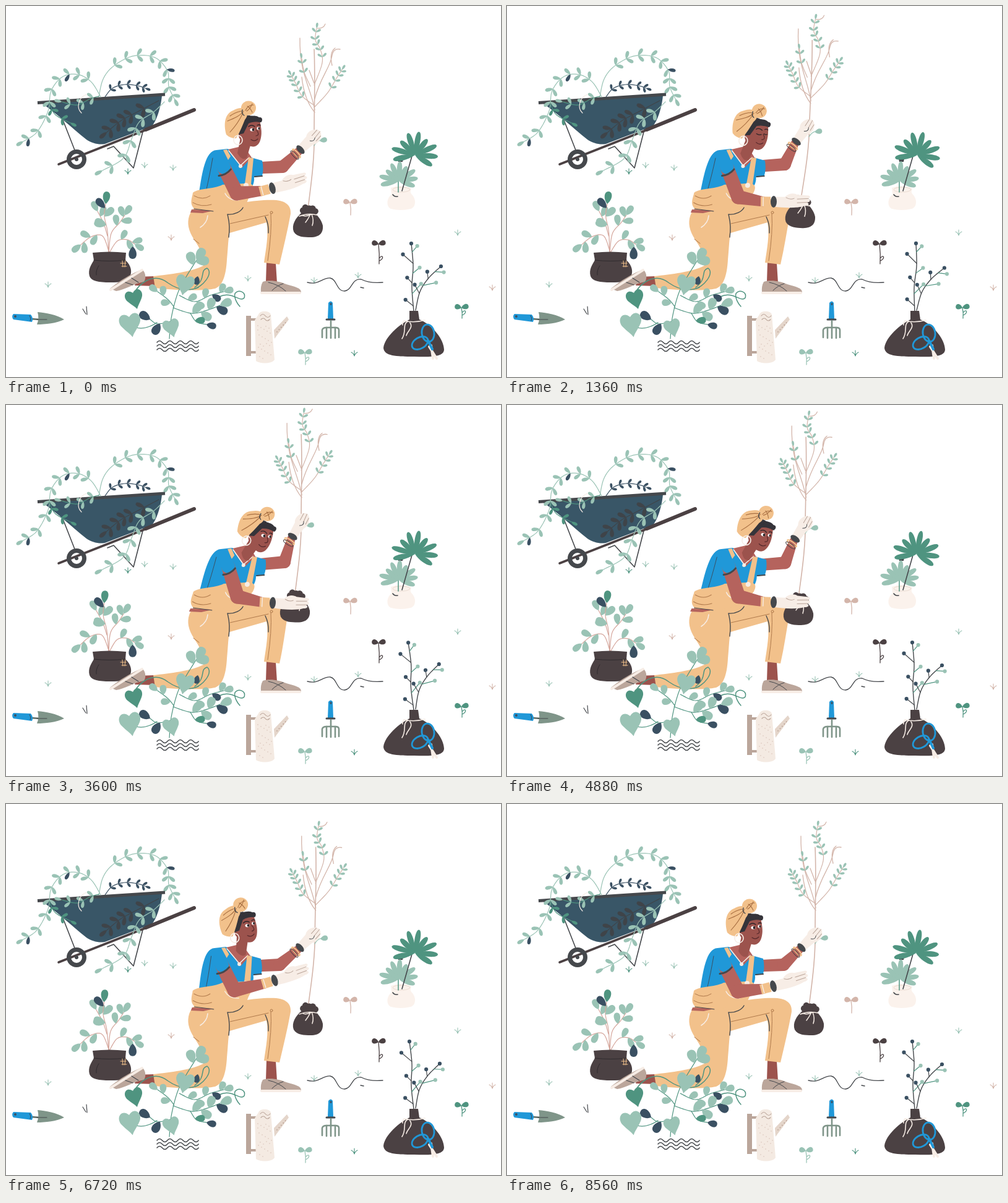
An HTML page with a canvas that plays this animation: 800 px wide and 600 px high, repeating every 8.64 s.

```html
<!DOCTYPE html>
<html lang="en">
<head>
<meta charset="utf-8">
<title>Gardening</title>
<style>
html, body { margin: 0; width: 100%; height: 100%; overflow: hidden; background: #fff; }
canvas { display: block; width: 800px; height: 600px; }
</style>
</head>
<body>
<canvas id="stage" width="800" height="600"></canvas>
<script>
const c = document.getElementById('stage').getContext('2d');
const LOOP = 8640, STEP = 80, RAD = Math.PI / 180;
const LIGHT = '#9ac3b5', GREEN = '#4f9480', NAVY = '#3a5062', DARK = '#4b4143', INK = '#45484c',
  ORANGE = '#f2c18b', SEAM = '#b07a4c', SKIN = '#b5635d', FACE = '#9c534d', BLUE = '#2098d8',
  CREAM = '#f7ede6', TAUPE = '#bba69b', TWIG = '#d3b5aa', STEEL = '#7f9589', PUPIL = '#2d2528';

// drawing helpers
function fill(d, col) { c.fillStyle = col; c.fill(new Path2D(d)); }
function line(d, col, w = 1.2) { c.strokeStyle = col; c.lineWidth = w; c.stroke(new Path2D(d)); }
function oval(x, y, rx, ry, col) {
  c.fillStyle = col; c.beginPath(); c.ellipse(x, y, rx, ry, 0, 0, 7); c.fill();
}
function ring(x, y, rx, ry, col, w, a = 0) {
  c.strokeStyle = col; c.lineWidth = w; c.beginPath(); c.ellipse(x, y, rx, ry, a * RAD, 0, 7); c.stroke();
}
function at(x, y, a, fn, s = 1) {
  c.save(); c.translate(x, y); c.rotate(a); c.scale(s, s); fn(); c.restore();
}
function turn(x, y, a, fn) {
  at(x, y, a, () => { c.translate(-x, -y); fn(); });
}
function leaf(x, y, len, wid, a, col) {
  at(x, y, a, () => {
    c.fillStyle = col; c.beginPath(); c.moveTo(0, 0);
    c.bezierCurveTo(len * .35, -wid * .7, len, -wid * .7, len, 0);
    c.bezierCurveTo(len, wid * .7, len * .35, wid * .7, 0, 0);
    c.fill();
  });
}
function heart(x, y, a, s, col) {
  at(x, y, a * RAD, () => fill('M0 0C-10 -12 -22 2 -12 14C-8 20 -3 24 0 30C3 24 8 20 12 14C22 2 10 -12 0 0Z', col), s);
}
function fan(x, y, n, from, to, len, wid, col) {
  for (let i = 0; i < n; i++)
    leaf(x, y, len * (1 + .1 * Math.sin(i * 2.2)), wid, (from + (to - from) * i / (n - 1)) * RAD, col);
}
function limb(a, b, r1, r2, col) {
  const g = Math.atan2(b[1] - a[1], b[0] - a[0]), q = Math.PI / 2;
  c.fillStyle = col; c.beginPath();
  c.arc(a[0], a[1], r1, g + q, g - q); c.arc(b[0], b[1], r2, g - q, g + q); c.fill();
}

// point and direction on a smooth curve through x, y pairs
function point(p, u) {
  const n = p.length / 2 - 1, i = Math.min(n - 1, Math.floor(u * n)), f = u * n - i;
  return [0, 1].map(k => {
    const g = j => p[Math.max(0, Math.min(n, j)) * 2 + k];
    const a = g(i - 1), b = g(i), d = g(i + 1), e = g(i + 2);
    return b + .5 * f * (d - a + f * (2 * a - 5 * b + 4 * d - e + f * (3 * (b - d) + e - a)));
  });
}
function along(p, u) {
  const [x, y] = point(p, u), [x0, y0] = point(p, Math.max(0, u - .02)), [x1, y1] = point(p, Math.min(1, u + .02));
  return [x, y, Math.atan2(y1 - y0, x1 - x0)];
}
function curve(p, col, w = 1.2) {
  c.strokeStyle = col; c.lineWidth = w; c.beginPath();
  for (let i = 0; i <= 40; i++) c.lineTo(...point(p, i / 40));
  c.stroke();
}
// stem with n pairs of leaves (or n single leaves) and one at the tip
function vine(p, n, len, col, { stem = col, from = .15, fat = .42, alt = false, tone = () => col } = {}) {
  curve(p, stem);
  for (let i = 0; i <= n; i++) {
    const tip = i === n, [x, y, a] = along(p, tip ? 1 : from + (1 - from) * (i + .3) / n);
    for (const s of tip ? [0] : alt ? [i % 2 * 2 - 1] : [-1, 1])
      leaf(x, y, len, len * fat, a + s * .9, tone(i, s));
  }
}

// timing helpers
function ramp(t, a, b) {
  const u = Math.max(0, Math.min(1, (t - a) / (b - a)));
  return u * u * (3 - 2 * u);
}
function bump(t, a, b) {
  return t > a && t < b ? Math.sin(Math.PI * (t - a) / (b - a)) ** 2 : 0;
}

function grass(col, ...spots) {
  for (const [x, y] of spots) line(`M${x} ${y}v-9M${x} ${y}q-1 -4 -5 -6M${x} ${y}q1 -4 5 -6`, col, 1.1);
}
function sprout(x, y, h, col, loop = true) {
  line(`M${x} ${y}q2 ${h / 2} 1 ${h}` + (loop ? 'm0 -9c7 -8 8 2 0 4' : ''), col, 1.3);
  fan(x, y, 2, 195, 345, 11, 8, col);
}
function ground() {
  grass(LIGHT, [68, 455], [224, 262], [270, 266], [391, 445], [498, 448], [569, 440], [730, 371]);
  grass(GREEN, [197, 272], [563, 566]);
  grass(TWIG, [267, 379], [786, 460]);
  sprout(556, 318, 20, TWIG, false);
  sprout(602, 385, 32, DARK);
  sprout(736, 488, 17, GREEN);
  sprout(483, 561, 19, LIGHT);
  line('M487 447C505 452 511 439 524 440C535 442 534 461 547 461C560 460 558 440 574 442Q588 449 609 447M573 455L578 456', INK, 1.3);
}

function barrow() {
  const dark = k => (i, s) => i % 6 === k && s <= 0 ? NAVY : LIGHT;
  vine([150, 147, 157, 118, 174, 97, 205, 81, 240, 83, 261, 105, 263, 130, 272, 150], 9, 13, LIGHT, { from: .27, tone: dark(5) });
  vine([160, 147, 172, 133, 192, 127, 213, 129, 225, 133], 5, 9, NAVY);
  line('M91 182L111 233M164 231L174 227L206 262L224 192', INK, 1.6);
  fill('M59 158L252 145C250 166 243 186 236 194L160 223C150 225 139 222 130 216C105 196 82 174 59 158Z', '#395667');
  line('M85 256L270 183', DARK, 3.5);
  line('M226 200L304 168', DARK, 6);
  c.lineCap = 'butt'; line('M51 156.5L257 143', INK, 5); c.lineCap = 'round';
  ring(114, 248, 12.5, 12.5, INK, 7); oval(114, 248, 3, 3, INK);
  vine([153, 147, 138, 123, 117, 111, 92, 114, 73, 137, 68, 170, 50, 204, 28, 219], 9, 13, LIGHT, { tone: dark(2) });
  vine([150, 146, 136, 150, 115, 160, 90, 155], 3, 12, LIGHT, { stem: GREEN });
  vine([70, 158, 80, 176, 104, 189], 2, 11, GREEN);
  line('M122 173c-9 -8 -5 -25 8 -30', CREAM);
  vine([247, 153, 207, 174, 185, 186, 163, 204], 5, 15, '#3f4449');
  vine([256, 155, 238, 172, 215, 188, 203, 215, 190, 246, 156, 266], 6, 14, LIGHT);
}

function bush(shift) {
  turn(167, 400, shift / 92, () => {
    const look = { stem: '#d5a69c', fat: .55, alt: true };
    const mixed = { ...look, tone: i => [LIGHT, LIGHT, NAVY, GREEN][i % 4] };
    vine([166, 400, 170, 368, 184, 350, 192, 338], 3, 18, LIGHT, { ...look, from: .5 });
    vine([166, 396, 156, 372, 138, 373, 121, 386], 3, 18, LIGHT, { ...look, from: .45 });
    vine([164, 372, 158, 352, 148, 332], 2, 18, LIGHT, { ...look, from: .3 });
    vine([167, 399, 180, 380, 196, 378, 208, 385], 3, 17, LIGHT, { ...look, from: .4 });
    vine([166, 402, 164, 365, 159, 340, 161, 320], 3, 20, GREEN, { ...mixed, from: .4 });
    leaf(205, 389, 20, 12, 1.6, NAVY);
  });
  fill('M140 399Q167 396 194 399L193 411C203 420 204 431 200 438C196 446 186 447 168 447C150 447 138 445 135 437C132 426 138 418 142 411Z', DARK);
  line('M142 411Q167 414 193 411M150 420q-5 7 -4 15', '#2f2b2e', 1);
  line('M185 416h9M187 421h8M188 412l1 10M193 412l-1 10', ORANGE, 1);
}

function tools() {
  line('M40 506L55 507', '#5c6a63', 2.5);
  fill('M51 495C64 496 82 499 94 507C82 513 64 515 50 515Q54 505 51 495Z', STEEL);
  line('M50 507H66', INK, 1);
  fill('M12 498L40 499Q45 505 42 511L12 507Q8 502 12 498Z', BLUE);
  oval(15, 502, 2, 2, NAVY); line('M38 501q3 4 1 8', NAVY);
  line('M124 490L129 498M130 486L131 499', INK);

  fill('M521 480Q525 475 528 480L529 506H520Z', BLUE);
  oval(525, 482, 1.5, 2, NAVY);
  line('M518 507H531', INK, 3);
  line('M525 509V520M511 536V524Q512 520 518 520H532Q538 520 538 524V536', STEEL, 2.6);
  for (let x = 518; x < 535; x += 7) line(`M${x} 520V537`, STEEL, 2.6);

  fill('M388 501H396V566H388Z', TAUPE); line('M396 507H409M396 560H405', TAUPE, 4);
  fill('M433 524L454 502L457 507L434 538Z', '#e4d5ca');
  fill('M408 499C410 492 426 492 428 499L434 572C430 579 410 579 404 574L402 508Z', '#f4eae2');
  line('M411 501q4 -5 8 0t8 0M412 507q4 -4 7 0t7 0', TAUPE);
  for (let i = 0; i < 24; i++) oval(407 + i * 37 % 23, 517 + i * 29 % 55, .8, .8, '#d6c2b6');
  for (let i = 0; i < 5; i++) oval(438 + i * 3.4, 527 - i * 3.7, .8, .8, '#a98f83');
}

function palm(deg) {
  fill('M622 294Q638 288 655 295Q652 302 656 305C664 313 662 326 654 328Q638 332 622 328C614 324 615 311 623 305Z', '#fbf2ec');
  ring(639, 297, 14, 4, '#eadcd2', 1);
  line('M625 305q3 4 8 3', INK, 1.6);
  line('M634 301V278', GREEN, 1.5);
  fill('M633 247h9l-1 5h-7Z', INK);
  fan(635, 283, 9, 168, 378, 30, 8, LIGHT);
  line('M640 299L656 243', INK, 1.6);
  fan(661 + deg * .4, 241, 9, 168 + deg, 392 + deg, 36, 8.5, GREEN);
}

function berrySack(shift) {
  const berries = (p, n, from) => {
    curve(p, INK, 1.4);
    for (let i = 0; i <= n; i++) {
      const [x, y, a] = along(p, from + (1 - from) * i / n), len = i < n ? 16 + 6 * Math.sin(i * 2) : 0, d = a + (i % 2 ? .8 : -.8);
      const bx = x + len * Math.cos(d), by = y + len * Math.sin(d), col = i % 2 ? LIGHT : NAVY;
      line(`M${x} ${y}L${bx} ${by}`, i % 2 ? GREEN : INK);
      oval(bx, by, 3.1, 3.1, col);
    }
  };
  turn(660, 492, shift / 108, () => {
    berries([659, 494, 656, 455, 658, 420, 655, 384], 6, .1);
    berries([662, 492, 669, 462, 683, 440, 703, 421], 4, .3);
  });
  fill('M652 493H666L668 507C690 516 708 540 708 556C707 567 690 568 660 567C630 567 611 566 610 553C612 535 636 515 652 507Z', DARK);
  line('M643 509Q660 513 677 508M649 510C640 516 648 526 640 538M652 511C660 520 648 526 647 533M650 510q-10 -3 -9 6', CREAM, 1.6);
  line('M684 551L696 570M687 549L690 570', CREAM, 4);
  ring(682, 529, 10, 14, BLUE, 2.8, -8); ring(669, 545, 9, 14, BLUE, 2.8, 60);
  line('M682 541L689 555', BLUE, 4);
}

function creeper() {
  const look = { stem: GREEN, fat: .65, alt: true };
  const mixed = { ...look, tone: i => i % 5 === 3 ? NAVY : LIGHT };
  line('M204 470C215 446 240 430 262 448C282 462 300 460 311 455M200 515C215 526 232 520 244 512' +
    'M305 455C325 440 312 428 325 424C336 432 318 455 302 458M345 470C365 460 378 480 385 472C388 462 376 458 370 465C368 472 374 482 378 486', GREEN, 1.5);
  vine([264, 538, 267, 505, 277, 466, 290, 440, 308, 411], 2, 22, LIGHT, { ...look, from: .9 });
  vine([271, 486, 262, 475, 245, 462], 2, 16, LIGHT, { ...look, from: .2 });
  vine([280, 468, 305, 478, 330, 468, 352, 462], 5, 16, LIGHT, mixed);
  vine([270, 488, 300, 497, 325, 492, 346, 484], 4, 20, LIGHT, { ...mixed, from: .3 });
  vine([298, 497, 308, 511, 324, 515], 1, 16, NAVY, { ...look, tone: i => i ? NAVY : GREEN });
  vine([266, 510, 245, 514, 233, 507], 1, 20, NAVY, look);
  leaf(310, 437, 14, 9, 1.8, NAVY);
  heart(205, 464, -15, .9, GREEN); heart(291, 440, 12, .95, LIGHT);
  heart(199, 503, -10, 1.1, LIGHT); heart(265, 511, -15, .85, LIGHT);
  for (let y = 544; y < 560; y += 6) line(`M244 ${y}q4 -5 8.4 0` + 't8.4 0'.repeat(7), INK, 1.5);
}

function legs(p) {
  const knee = 460 - 4 * p;
  fill('M212 438L240 437L241 453L208 452Z', FACE);
  fill('M168 457C184 444 204 432 220 426C227 432 226 442 223 446C206 449 192 459 178 461Z', TAUPE);
  line('M169 459L220 427', CREAM, 4); line('M193 447l12 4M203 440l11 7', INK);
  fill('M421 414L436 416L438 448L420 447Z', FACE);
  fill('M415 446C425 442 443 445 453 450C467 454 477 456 477 463H412Q411 453 415 446Z', TAUPE);
  line('M413 464H475', CREAM, 4); line('M424 447Q440 450 452 461M448 449Q438 452 430 460', INK, 1);
  fill(`M384 318C400 315 420 313 ${knee - 23} 314C${knee - 6} 316 ${knee + 1} 324 ${knee} 336C${knee - 5} 364 448 392 442 418L417 415C420 393 425 370 421 350L358 368Z`, ORANGE);
  fill('M308 324C296 332 293 345 295 357C298 372 308 382 312 391C316 404 313 412 319 420C300 430 265 434 238 437L241 456C270 460 320 461 338 457C352 452 356 430 357 410C359 390 359 375 362 362L400 318Z', ORANGE);
  line('M360 374C363 352 359 343 358 337C370 338 380 332 383 326M419 341Q425 353 424 367', INK, 1.4);
  line('M314 358Q325 351 326 339', CREAM, 1.6);
  line('M362 352L424 338M428 336Q430 365 423 412M303 377l9 7', SEAM, 1);
  ring(429, 334, 2, 2, SEAM, 1);
}

function torso() {
  fill('M340 233L358 231L396 245L414 250Q417 263 414 275L401 277Q402 292 390 300L312 302C317 270 322 234 340 233Z', BLUE);
  fill('M359 232L381 262L397 245L384 226Z', SKIN);
  line('M360 234L379 258L393 245', CREAM, 1.6); oval(379, 259, 3, 3, CREAM);
  line('M402 276L414 275', INK, 2); line('M334 246Q329 275 324 296', NAVY, 1);
  fill('M302 302C312 294 334 297 350 289L386 287L392 245L400 246L396 288Q403 291 398 302Q391 311 388 322L340 333L306 329C295 321 301 310 302 302Z', ORANGE);
  fill('M351 233L357 232L363 243L359 249Z', ORANGE);
  line('M354 303Q360 315 376 314', CREAM, 1.4);
  line('M304 307q14 8 26 0M302 318q14 8 30 3', SEAM, 1);
  fill('M300 329L335 331L318 335L298 334Z', SKIN); line('M304 328L335 332', INK, 1);
  oval(388, 290, 4, 4, CREAM);
}

function head(closed) {
  fill('M380 208L396 222L389 246Q381 251 374 238Z', FACE);
  fill('M378 197L389 184L410 184C412 195 414 204 412 213C410 224 404 229 396 227C388 225 383 221 380 217Q373 212 378 197Z', FACE);
  fill('M376 193Q386 176 396 178Q411 175 413 188Q400 186 392 190Q387 200 384 206L376 208Z', '#35343a');
  for (let i = 0; i < 6; i++) oval(388 + i * 4.4, 180 + i * .8, 4, 4, '#35343a');
  fill('M356 208C351 190 354 174 367 169Q377 163 386 166C392 172 391 178 386 184C382 194 378 204 372 214Q362 214 356 208Z', ORANGE);
  oval(392, 165, 12, 11.5, ORANGE);
  line('M384 170C378 178 368 182 358 186M383 173Q375 190 362 204M380 170Q370 172 362 178M387 169q4 -9 13 -9M390 162q5 3 8 10M398 158q-3 8 -9 12', '#a86f42', 1.1);
  line('M382 168q-2 6 3 9', INK, 1.4);
  ring(375, 217, 7, 7.5, CREAM, 1.6);
  if (closed) line('M394 202q4 2 8 0M406 200q3 2 5 0', PUPIL);
  else {
    oval(398, 200, 3.6, 2.6, '#fff'); oval(408, 198, 2.6, 2.4, '#fff');
    oval(399.5, 200, 1.9, 2.2, PUPIL); oval(409, 198, 1.6, 2, PUPIL);
  }
  line('M392 195Q397 191 402 195M406 193Q409 191 411 193', PUPIL, 1.3);
  line('M405 201Q411 209 404 210M396 216Q402 220 407 215', '#55292b');
}

function tree() {
  const look = { stem: TWIG, fat: .4 };
  line('M488 328C492 295 499 250 498 205C498 160 500 120 498 70', TWIG, 1.6);
  line('M499 168C492 130 474 110 475 52M499 150C508 115 524 100 527 80Q529 68 540 70M527 96Q522 75 532 68M498 125L490 104' +
    'M499 172Q482 152 478 115', TWIG, 1.3);
  vine([497, 160, 478, 145, 468, 125, 461, 112], 5, 9, LIGHT, { ...look, from: .25 });
  vine([499, 163, 520, 140, 534, 117, 543, 103], 4, 9, LIGHT, { ...look, from: .4 });
  vine([498, 128, 511, 92, 508, 70, 500, 55, 502, 36], 5, 9, LIGHT, { ...look, from: .3 });
  vine([492, 130, 482, 107, 478, 85], 2, 9, LIGHT, { ...look, from: .4 });
  line('M503 36Q513 37 516 29', TWIG);
  line('M498 226Q502 218 509 217', LIGHT); leaf(507, 218, 12, 8, -.2, LIGHT);
  fan(489, 337, 5, 215, 335, 16, 10, DARK);
  fill('M477 335C468 343 461 354 465 365C470 374 483 374 492 374C508 374 513 366 512 355C510 346 504 340 500 335Z', DARK);
  line('M474 340Q488 334 503 338M492 337Q488 345 484 350M494 337Q498 346 495 355M493 337q-8 4 -13 2', CREAM, 1.5);
}

function nearHand() {
  fill('M0 -8L18 -8C25 -15 33 -15 38 -12L56 -11C60 -10 59 -7 55 -6C61 -4 59 0 54 0C59 3 56 6 50 6C38 10 18 10 0 8Z', CREAM);
  line('M55 -6L38 -5M54 0L38 1M20 -7Q27 -3 33 -6', TAUPE, 1);
  oval(0, 0, 5, 9.5, INK);
}
function farHand() {
  fill('M0 -7L20 -9C26 -14 36 -11 40 -6Q45 0 40 5C35 11 26 12 19 8L0 7Z', CREAM);
  line('M40 -5L28 -4M42 0L29 2M38 6L27 7', TAUPE, 1); line('M20 0q4 6 9 2', INK, 1);
  oval(-1, 0, 4.5, 8.5, INK);
}

function gardener(t) {
  const lift = ramp(t, 200, 2100) - ramp(t, 4400, 6100);
  const back = bump(t, 5400, 8400);
  const nod = ramp(t, 500, 2200) - ramp(t, 4600, 5900) - .42 * back;
  const crown = 9 * bump(t, 200, 2250) - 4 * bump(t, 2200, 3300) + 3 * bump(t, 3300, 8640);
  const reach = Math.sin(lift * Math.PI / 2), lean = 7 * nod;
  const mix = (k, a, b, dx, dy) => [a[0] + (b[0] - a[0]) * k + dx * back, a[1] + (b[1] - a[1]) * k + dy * back];

  const farElbow = mix(lift, [447, 260], [450, 254], -5, 0), farWrist = mix(lift, [473, 235], [461, 216], -1, 0);
  limb([402 + lean * .6, 262 - 4 * lift], farElbow, 9.5, 10, SKIN);
  limb(farElbow, farWrist, 10, 6.5, SKIN);
  legs(lift);
  c.save();
  c.transform(1, 0, -lean / 75, 1, lean * 310 / 75, 0);
  torso();
  c.restore();
  at(383 + lean, 235 + 4 * nod, 20 * RAD * nod, () => {
    c.translate(-383, -235);
    head(t >= 1280 && t < 1480);
  });

  c.save();
  c.translate(-21 * lift, -22.5 * lift);
  turn(488, 352, crown / 265, tree);
  c.restore();

  at(...farWrist, -.75 - .25 * lift, () => {
    ring(-5, 0, 2.5, 9, ORANGE, 2); ring(-9, 0, 2.5, 9, DARK, 1);
    c.translate(5, 0); farHand();
  });

  const shoulder = [348 + lean, 252], cuff = [shoulder[0] + 4, 261];
  const elbow = mix(reach, [373, 303], [374, 310], -4, -2), wrist = mix(reach, [414, 299], [414, 319], 4, -9);
  limb(cuff, elbow, 11, 11.5, SKIN);
  limb(elbow, wrist, 11.5, 8, SKIN);
  limb(shoulder, cuff, 10, 11, BLUE);
  at(shoulder[0] + 5, 268, -.45, () => line('M-11 2Q0 6 11 1', INK, 3));
  at(...wrist, -.26 + .32 * reach - .04 * back, () => {
    fill('M-4 -8H12V8H-4Z', ORANGE); line('M0 -7V7', CREAM, 1.4);
    c.translate(17, 0); nearHand();
  });
}

function draw(t) {
  c.fillStyle = '#fff'; c.fillRect(0, 0, 800, 600);
  c.lineCap = c.lineJoin = 'round';
  ground();
  barrow();
  bush(1.5 * bump(t, 0, 2000) - 3 * bump(t, 2000, 4700) - 3 * bump(t, 5200, 8300));
  tools();
  palm(5 * bump(t, 0, 2720) + 2 * bump(t, 3900, 5900));
  berrySack(6 * bump(t, 0, 2720) - 5 * bump(t, 2700, 4700) - 3 * bump(t, 4900, 8500));
  gardener(t);
  creeper();
}

const start = performance.now();
let last = -1;
function tick() {
  const t = Math.floor((performance.now() - start) % LOOP / STEP) * STEP;
  if (t !== last) draw(last = t);
  requestAnimationFrame(tick);
}
tick();
</script>
</body>
</html>
```
